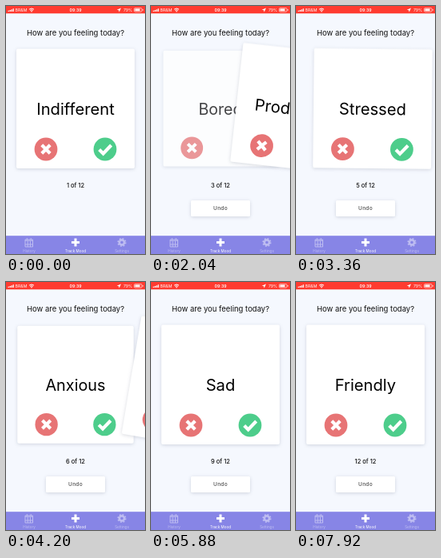
Write an HTML page that moves like this. It is 174 px wide and 310 px high and loops after 8000 ms.

```html
<!DOCTYPE html>
<html lang="en">
<head>
<meta charset="utf-8">
<title>Mood tracker</title>
<style>
html, body { margin: 0; width: 100%; height: 100%; overflow: hidden; background: #f5f8fe; }
svg { display: block; width: 100vw; height: 100vh; font-family: Inter, Roboto, sans-serif; }
text { text-anchor: middle; fill: #111; }
.panel { fill: #fff; filter: drop-shadow(0 1px 2px rgba(40, 50, 80, .18)); }
.word { font-size: 20.2px; fill: #000; }
.mark { fill: none; stroke: #fff; stroke-width: 4.2; }
.bar text { font-size: 5.2px; fill: #fff; }
.tab text { font-size: 4.6px; fill: #fff; }
.dim { opacity: .45; }
</style>
</head>
<body>
<svg viewBox="0 0 174 310">
  <defs>
    <g id="buttons">
      <circle cx="50" cy="179" r="14.4" fill="#e77475"/>
      <path class="mark" d="M44.8 173.8l10.4 10.4m0-10.4l-10.4 10.4"/>
      <circle cx="124" cy="179" r="14.4" fill="#4dcd8b"/>
      <path class="mark" d="M116.7 179.5l5 5 10-10.5"/>
    </g>
  </defs>
  <rect width="174" height="310" fill="#f5f8fe"/>
  <text x="87" y="37" font-size="9.5">How are you feeling today?</text>
  <text id="count" x="87" y="227" font-size="7.5" font-weight="500"></text>
  <g id="undo">
    <rect class="panel" x="50" y="243" width="74" height="20" rx="1.5"/>
    <text x="87" y="255.4" font-size="6.6" font-weight="600" letter-spacing=".2" style="fill:#666">Undo</text>
  </g>

  <g id="next">
    <rect class="panel" x="13" y="53.5" width="148" height="149.5" rx="2"/>
    <text class="word" x="87" y="136"></text>
    <use href="#buttons"/>
  </g>
  <g id="top">
    <rect class="panel" x="13" y="53.5" width="148" height="149.5" rx="2"/>
    <text class="word" x="87" y="136"></text>
    <use href="#buttons"/>
  </g>

  <g class="bar">
    <rect width="174" height="9.3" fill="#ff3b30"/>
    <path d="M3.2 7V5.7M5.2 7V5M7.2 7V4.2M9.2 7V3.2" stroke="#fff" stroke-width="1.3"/>
    <text x="19" y="6.8">BR&amp;M</text>
    <path d="M29 4.2q3-2.4 6 0M30.2 5.5q1.8-1.4 3.6 0" fill="none" stroke="#fff"/>
    <circle cx="32" cy="6.8" r=".8" fill="#fff"/>
    <text x="87" y="6.8" style="font-weight:600">09:39</text>
    <path d="M144 2.5l-2.3 5.2-.5-2.4-2.4-.5z" fill="#fff"/>
    <text x="152.5" y="6.8">79%</text>
    <rect x="160.5" y="2.6" width="9.5" height="4.6" rx="1" fill="none" stroke="#fff" stroke-width=".6"/>
    <path d="M161.4 3.5h6.2v2.8h-6.2zM170.8 4h.8v1.8h-.8z" fill="#fff"/>
  </g>

  <g class="tab">
    <rect y="287.2" width="174" height="23" fill="#8785e6"/>
    <g class="dim">
      <path d="M24 292h9.5v9H24zM24 293.2h9.5M24 298h9.5M27.2 294v7M30.4 294v7M26.3 290v3M31.2 290v3" fill="none" stroke="#fff"/>
      <text x="29" y="308.1">History</text>
    </g>
    <path d="M82 295.5h10M87 290.5v10" stroke="#fff" stroke-width="3"/>
    <text x="87" y="308.1">Track Mood</text>
    <g class="dim">
      <circle cx="145" cy="295.5" r="3.1" fill="none" stroke="#fff" stroke-width="2.6"/>
      <circle cx="145" cy="295.5" r="4.8" fill="none" stroke="#fff" stroke-width="1.6" stroke-dasharray="1.885"/>
      <text x="145" y="308.1">Settings</text>
    </g>
  </g>
</svg>
<script>
const LOOP = 8000, STEP = 120;
const moods = ["Indifferent", "Happy", "Productive", "Bored", "Stressed", "Relaxed",
  "Anxious", "Excited", "Sad", "Tired", "Focused", "Friendly"];
// one swipe per card: start time, number of steps, direction
const swipes = [[480, 2, -1], [960, 7, 1], [1800, 5, 1], [2640, 3, -1], [3360, 3, 1], [4080, 3, 1],
  [4680, 5, -1], [5280, 4, 1], [6000, 3, -1], [6480, 5, -1], [7440, 3, 1]];
const [topCard, nextCard, count, undo] =
  ["top", "next", "count", "undo"].map(id => document.getElementById(id));

function setWord(card, word = "") {
  card.querySelector("text").textContent = word;
}

function draw(time) {
  const t = Math.floor(time % LOOP / STEP) * STEP;
  const progress = ([start, steps]) => Math.max(0, ((t - start) / STEP + 1) / steps);
  const index = swipes.filter(s => progress(s) >= 1).length;
  const swipe = swipes[index];
  const dx = swipe ? swipe[2] * 725 * progress(swipe) ** 4 : 0;
  const pull = Math.min(1, Math.abs(dx) / 200);

  setWord(topCard, moods[index]);
  topCard.setAttribute("transform", `translate(${dx}) rotate(${dx * .067} 87 128)`);
  setWord(nextCard, moods[index + 1]);
  nextCard.setAttribute("transform", `translate(87 128) scale(${.94 + .06 * pull}) translate(-87 -128)`);
  nextCard.style.opacity = Math.min(1, pull * 1.55);
  count.textContent = `${index + 1} of ${moods.length}`;
  undo.style.display = index ? "" : "none";
}

const begin = performance.now();
function tick() {
  draw(performance.now() - begin);
  requestAnimationFrame(tick);
}
tick();
</script>
</body>
</html>
```
